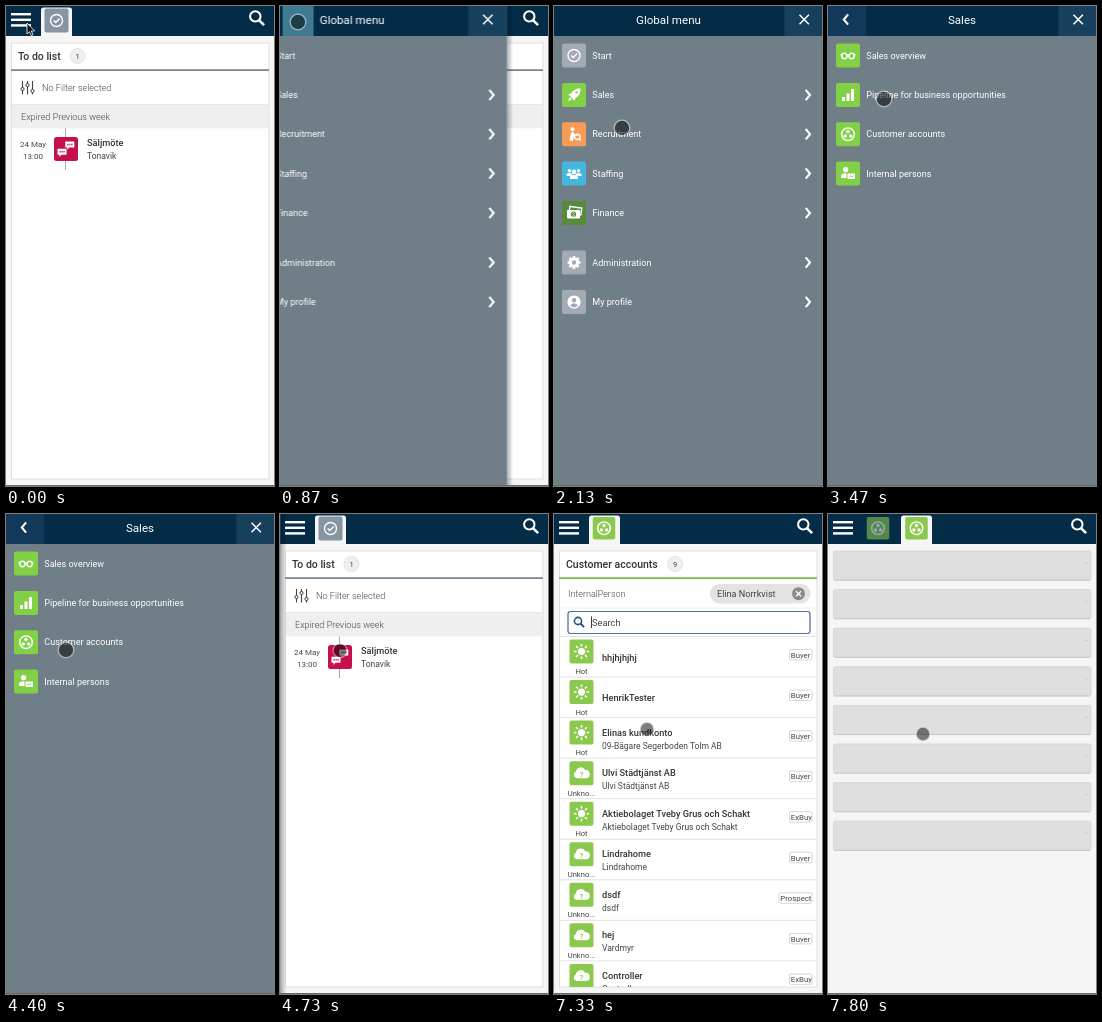
Animation of 268x480 px, one loop 8000 ms. Source, as an HTML page:

```html
<!DOCTYPE html>
<html lang="en">
<head>
<meta charset="utf-8">
<title>CRM mobile menu</title>
<style>
html, body { margin: 0; width: 100%; height: 100%; overflow: hidden; background: #f5f5f5; }
svg { display: block; width: 100vw; height: 100vh; font-family: Roboto, "Open Sans", sans-serif; }
text { fill: #444; white-space: pre; }
.b { font-weight: 500; fill: #333; }
.l { font-weight: 300; }
.w { fill: #fff; }
.mid { text-anchor: middle; }
.ln { fill: none; stroke: #fff; stroke-width: 1.4; }

.cut { animation: 8s step-end infinite; }
#todo { animation-name: todo; }
#bones { animation-name: bones; }
#list { animation-name: list; }
#rows { animation-name: rows; }
#press { animation-name: press; }
#focus { animation-name: focus; }
#tabA { animation-name: list2; }
#tabB { animation-name: last; }
#arrow { animation: arrow 8s linear infinite; }
#touch { animation: touch 8s ease-in-out infinite; }
#dot { animation: dot 8s step-end infinite; }
#panel { animation: panel 8s linear infinite; }
#brand { animation: brand 8s linear infinite; }
#main { animation: main 8s linear infinite; }
#sales { animation: sales 8s linear infinite; }
#bar { animation: bar 8s linear infinite; }

@keyframes todo { 0% { opacity: 1 } 61.625%, 100% { opacity: 0 } }
@keyframes bones { 0% { opacity: 0 } 61.625% { opacity: 1 } 66.625% { opacity: 0 } 97.5%, 100% { opacity: 1 } }
@keyframes list { 0% { opacity: 0 } 66.625% { opacity: 1 } 97.5%, 100% { opacity: 0 } }
@keyframes list2 { 0% { opacity: 0 } 61.625% { opacity: 1 } 97.5%, 100% { opacity: 0 } }
@keyframes rows { 0% { opacity: 0 } 68.375%, 100% { opacity: 1 } }
@keyframes press { 0% { opacity: 0 } 94.125%, 100% { opacity: .07 } }
@keyframes focus { 0% { opacity: 1 } 94.125%, 100% { opacity: 0 } }
@keyframes last { 0% { opacity: 0 } 97.5%, 100% { opacity: 1 } }
@keyframes arrow {
  0%, 2.9% { transform: translate(21px, 17px); opacity: 1 }
  6.6% { transform: translate(18px, 13px); opacity: 1 }
  6.61%, 100% { transform: translate(18px, 13px); opacity: 0 }
}
@keyframes touch {
  0%, 17% { transform: translate(18px, 16px); animation-timing-function: ease-in }
  21% { transform: translate(44px, 88px); animation-timing-function: ease-out }
  24% { transform: translate(63px, 162px) }
  26.6%, 28% { transform: translate(68px, 122px) }
  30.9%, 45.5% { transform: translate(56px, 93px) }
  55.9%, 83% { transform: translate(60px, 136.5px) }
  93.4%, 100% { transform: translate(95px, 220px) }
}
@keyframes dot {
  0% { opacity: 0; transform: scale(1) }
  6.61% { opacity: 1; transform: scale(1) }
  56.625%, 100% { opacity: 1; transform: scale(.9) }
}
@keyframes panel {
  0% { transform: translate(-280px, 0) }
  9.4% { transform: translate(-280px, 0); animation-timing-function: cubic-bezier(.22, 1, .36, 1) }
  14.125%, 59.12% { transform: translate(0, 0) }
  59.125%, 60% { transform: translate(-269px, 0) }
  60.01%, 100% { transform: translate(-280px, 0) }
}
@keyframes brand { 0%, 11.5% { opacity: 1 } 14%, 100% { opacity: 0 } }
@keyframes main { 0%, 33% { opacity: 1 } 35%, 100% { opacity: 0 } }
@keyframes sales { 0%, 33% { opacity: 0 } 35%, 100% { opacity: 1 } }
@keyframes bar { 0%, 77% { opacity: 1 } 82%, 100% { opacity: 0 } }
</style>
</head>
<body>
<svg id="stage" viewBox="0 0 268 480" preserveAspectRatio="none"></svg>
<script>
const GREEN = '#8bc94e', SLATE = '#a2abb5', NAVY = '#042c47';

const text = (x, y, size, cls, s) => `<text x="${x}" y="${y}" font-size="${size}" class="${cls}">${s}</text>`;
const rect = (x, y, w, h, fill, more = '') => `<rect x="${x}" y="${y}" width="${w}" height="${h}" fill="${fill}" ${more}/>`;
const disc = (x, y, r, fill = '#fff') => `<circle cx="${x}" cy="${y}" r="${r}" fill="${fill}"/>`;
const path = (d, more = 'fill="#fff"') => `<path d="${d}" ${more}/>`;
const line = (d, color, w, more = '') => path(d, `fill="none" stroke="${color}" stroke-width="${w}" ${more}`);
const at = (x, y, s) => `<g transform="translate(${x} ${y})">${s}</g>`;
const group = (id, s, cls = '') => `<g id="${id}" class="${cls}">${s}</g>`;
const ring = r => `<circle r="${r}" class="ln"/>`;
const spokes = (n, a, b, w) => Array.from({ length: n }, (_, i) =>
  `<path d="M0 ${-a}V${-b}" stroke="#fff" stroke-width="${w}" transform="rotate(${i * 360 / n})"/>`).join('');
const person = (x, y, k) => `<g transform="translate(${x} ${y}) scale(${k})">${disc(0, -2.6, 2.3)}${path('M-4 4.5V3Q-4 .5 0 .5T4 3V4.5Z')}</g>`;

const icons = {
  check: ring(6) + line('M-2.8 0l2 2 4-4', '#fff', 1.4),
  rocket: path('M6.5-6.5C1.5-6.5-1-4.5-3-1.5L-6-.5-4 1-1 4 .5 6 1.5 3C4.5 1 6.5-1.5 6.5-6.5Z') +
    path('M-4.2 2l2.2 2.2-4.2 2Z') + disc(2.6, -2.6, 1.2, GREEN),
  recruit: disc(-1.5, -5, 2) + path('M-4.5 6.5L-3-1.5-1-2.5 1 0 4 0V1.5H0L-1 6.5Z') +
    `<circle cx="3.3" cy="2.6" r="2.7" class="ln"/>` + line('M5 4.6l2 2', '#fff', 1.5),
  staff: person(-4.6, -.8, .75) + person(4.6, -.8, .75) + person(0, 1, 1),
  cash: rect(-5, -6, 12, 7, 'none', 'class="ln" transform="rotate(8)"') + rect(-7, -3, 13, 8.5, '#fff', 'rx="1"') +
    disc(-.5, 1.2, 2.6, '#558b3a') + text(-.5, 3, 5, 'w mid', '$'),
  gear: spokes(8, 6.4, 3, 2.6) + `<circle r="3.6" fill="none" stroke="#fff" stroke-width="2.8"/>`,
  profile: disc(0, 0, 6.6) + disc(0, -1.8, 2.2, SLATE) + path('M-3.8 3.8Q-3 1.2 0 1.2T3.8 3.8Q2 5.3 0 5.3T-3.8 3.8Z', `fill="${SLATE}"`),
  glasses: at(-3.6, .5, ring(2.7)) + at(3.6, .5, ring(2.7)) + line('M-1.2 0Q0-1 1.2 0M-6.2 0L-7.4-1.4M6.2 0L7.4-1.4', '#fff', 1.2),
  bars: rect(-6, 2, 3, 4, '#fff') + rect(-1.5, -1.5, 3, 7.5, '#fff') + rect(3, -6, 3, 12, '#fff'),
  accounts: ring(6.3) + disc(0, -2.7, 1.7) + disc(-2.6, 1.8, 1.7) + disc(2.6, 1.8, 1.7),
  card: person(-2.4, -.8, 1.15) + rect(-1, -.5, 8.5, 6.5, '#fff', `stroke="${GREEN}"`) + line('M1 4l1.6-2 1.5 1.5L5.6 2', GREEN, .9),
  sun: disc(0, 0, 3.6) + spokes(8, 7.6, 5, 1.5),
  cloud: path('M-5 5A3.5 3.5 0 0 1-5.6-1.6 5 5 0 0 1 3.8-3 4 4 0 0 1 4.8 5Z') + text(0, 4, 8, 'b mid', '?').replace('<text', `<text style="fill:${GREEN}"`)
};
const tile = (x, y, color, icon, s = 24) =>
  at(x, y, rect(-s / 2, -s / 2, s, s, color, 'rx="2"') + icons[icon]);
const lens = (x, y, r, w, color) =>
  `<circle cx="${x}" cy="${y}" r="${r}" fill="none" stroke="${color}" stroke-width="${w}"/>` +
  line(`M${x + r * .7} ${y + r * .7}l${r} ${r}`, color, w * 1.25);
const tab = x => path(`M${x} 30V4q0-2.5 2.5-2.5h26q2.5 0 2.5 2.5V30Z`, 'fill="#f5f5f5"');

const topBar = rect(0, 0, 268, 30, NAVY) +
  [7, 12.6, 18.2].map(y => rect(5, y, 20, 2.4, '#fff')).join('') + lens(249.3, 10.4, 5.2, 2, '#fff');

const card = (title, count, cx, color) =>
  rect(5.5, 37, 257.5, 436, '#fff', 'stroke="#dfdfdf"') + rect(5, 63.2, 258, 1.8, color) +
  text(12, 53.6, 10.5, 'b', title) +
  `<circle cx="${cx}" cy="50" r="7.5" fill="#efefef" stroke="#ddd" stroke-width=".8"/>` + text(cx, 52.8, 7.5, 'mid', count);

const bubble = (x, y) => at(x, y, path('M-4.5-3.5h9v6h-5l-2 2.2v-2.2h-2Z') +
  line('M-2.5-.5h1.2m.8 0h1.2m.8 0h1.2', '#c5104d', 1.4));
const sliders = [[16.5, 83], [21.5, 79], [26.5, 85]].map(([x, y]) =>
  line(`M${x} 75V88.5`, '#444', 1.1) + `<circle cx="${x}" cy="${y}" r="1.6" fill="#fff" stroke="#444"/>`).join('');

const todo = rect(0, 30, 268, 450, '#f5f5f5') + tab(35) + tile(50.5, 14.5, '#8794a2', 'check') +
  card('To do list', 1, 71.5, '#7b8893') + sliders +
  text(36, 85.4, 9.1, 'l', 'No Filter selected') +
  rect(6, 98.5, 256.5, 23.8, '#efefef') + line('M6 98.5H262.5', '#e4e4e4', .8) +
  text(15, 113.7, 9.1, 'l', 'Expired Previous week') +
  line('M59.5 122.5V164', '#aaa', 1) + rect(48, 131, 24, 24, '#c5104d', 'rx="2.5"') +
  bubble(63.8, 139) + bubble(56, 146.2) +
  text(14, 140.6, 8, '', '24 May') + text(17, 152.8, 8, '', '13:00') +
  text(81, 139.8, 9.2, 'b', 'Säljmöte') + text(81, 153.2, 8.5, '', 'Tonavik');

const accounts = [
  ['hhjhjhjhj', '', 1, 'Buyer'],
  ['HenrikTester', '', 1, 'Buyer'],
  ['Elinas kundkonto', '09-Bägare Segerboden Tolm AB', 1, 'Buyer'],
  ['Ulvi Städtjänst AB', 'Ulvi Städtjänst AB', 0, 'Buyer'],
  ['Aktiebolaget Tveby Grus och Schakt', 'Aktiebolaget Tveby Grus och Schakt', 1, 'ExBuy'],
  ['Lindrahome', 'Lindrahome', 0, 'Buyer'],
  ['dsdf', 'dsdf', 0, 'Prospect'],
  ['hej', 'Vardmyr', 0, 'Buyer'],
  ['Controller', 'Controller', 0, 'ExBuy']
];
// The tags are shallow, so their descenders are cut off
const tag = s => {
  const x = s === 'Prospect' ? 225 : 235.5;
  return text(x + 1.3, 21.3, 7.8, '', s) + rect(x, 22, 23, 3, '#fff') +
    rect(x, 13, 258 - x, 10.5, 'none', 'rx="1.5" stroke="#ccc" stroke-width=".8"');
};
const row = ([name, sub, hot, kind], i) => at(0, 122.5 + i * 40.55,
  line('M6 0H262.5', '#e2e2e2', 1) + tile(27.5, 15, GREEN, hot ? 'sun' : 'cloud') +
  text(27.5, 37.6, 7.6, 'mid', hot ? 'Hot' : 'Unkno...') +
  text(48, sub ? 18 : 24, 9.2, 'b', name) + text(48, 31, 8.5, '', sub) + tag(kind));

const list = rect(0, 30, 268, 450, '#f5f5f5') + card('Customer accounts', 9, 121, '#7fc04a') +
  text(14, 82.8, 9, 'l', 'InternalPerson') + rect(156, 70, 100.5, 19.5, '#e3e3e3', 'rx="9.75"') +
  text(163, 82.8, 9.1, '', 'Elina Norrkvist') + disc(244.5, 79.7, 6.5, '#8b8b8b') +
  line('M242 77.2l5 5m0-5l-5 5', '#fff', 1.3) + line('M6 94H262.5', '#ececec', .8) +
  rect(14, 97.5, 242, 22, '#fff', 'rx="2.5" stroke="#c4c9d0"') + lens(24, 107, 3.6, 1.6, '#24567f') +
  text(38, 111.8, 9.3, '', 'Search') +
  group('focus', rect(14, 97.5, 242, 22, 'none', 'rx="2.5" stroke="#4c6f9c" stroke-width="1.1"') +
    rect(37, 102.5, .9, 11.5, '#222'), 'cut') +
  group('rows', `<g clip-path="url(#inner)">${accounts.map(row).join('')}</g>` +
    group('bar', rect(259, 125, 2.2, 280, '#c9c9c9', 'rx="1.1"')), 'cut') +
  group('press', rect(6, 204, 256.5, 40, '#000'), 'cut');

const bones = rect(0, 30, 268, 450, '#f5f5f5') + Array.from({ length: 8 }, (_, i) =>
  at(5.5, 37 + i * 38.6, rect(0, 0, 257.5, 29, '#dfdfdf', 'rx="1.5" stroke="#d2d2d2" stroke-width=".8"') +
    line('M1 29.2H256.5', '#c4c4c4', .9) + disc(253, 12, .6, '#aaa'))).join('');

const chevron = (x, y, dir = 1) => line(`M${x - 2.3 * dir} ${y - 5.2}L${x + 2 * dir} ${y}L${x - 2.3 * dir} ${y + 5.2}`, '#fff', 2.1);
const menuRow = ([label, y, color, icon, more]) =>
  tile(20, y, color, icon) + text(38.3, y + 3.2, 9.05, 'w', label) + (more ? chevron(254, y) : '');

const mainMenu = text(114.5, 17.8, 11.6, 'w mid', 'Global menu') + [
  ['Start', 49.5, SLATE, 'check'],
  ['Sales', 89, '#82d046', 'rocket', 1],
  ['Recruitment', 128.2, '#f79b55', 'recruit', 1],
  ['Staffing', 167.5, '#45b6dd', 'staff', 1],
  ['Finance', 207, '#558b3a', 'cash', 1],
  ['Administration', 256.5, SLATE, 'gear', 1],
  ['My profile', 296, SLATE, 'profile', 1]
].map(menuRow).join('');

const salesMenu = rect(0, 0, 38, 30, '#12395a') + chevron(17.8, 13.5, -1) + text(134, 17.8, 11.6, 'w mid', 'Sales') + [
  ['Sales overview', 49.5, '#82d046', 'glasses'],
  ['Pipeline for business opportunities', 89, '#82d046', 'bars'],
  ['Customer accounts', 128.2, '#82d046', 'accounts'],
  ['Internal persons', 167.5, '#82d046', 'card']
].map(menuRow).join('');

const panel = rect(269.5, 0, 6, 480, 'url(#shade)') + rect(-4, 0, 273.5, 480, '#707e87') + rect(-4, 0, 273.5, 30, NAVY) +
  group('brand', rect(45, 0, 31, 30, '#3f7a90')) +
  rect(230.5, 0, 39, 30, '#17405c') + line('M245.5 8.8l9.4 9.4m0-9.4l-9.4 9.4', '#fff', 1.5) +
  group('main', mainMenu) + group('sales', salesMenu);

document.getElementById('stage').innerHTML =
  `<defs><clipPath id="inner"><rect x="5" y="120" width="258" height="353"/></clipPath>
  <linearGradient id="shade"><stop stop-color="#000" stop-opacity=".3"/><stop offset="1" stop-color="#000" stop-opacity="0"/></linearGradient></defs>` +
  rect(0, 0, 268, 480, '#f5f5f5') + topBar +
  group('todo', todo, 'cut') + group('bones', bones, 'cut') + group('list', list, 'cut') +
  group('tabA', tab(35) + tile(50, 14.2, GREEN, 'accounts', 22.5), 'cut') +
  group('tabB', `<g opacity=".6">${tile(50, 14.2, GREEN, 'accounts', 22.5)}</g>` + tab(73) + tile(88.5, 14.2, GREEN, 'accounts', 22.5), 'cut') +
  group('panel', panel) + rect(0, 479, 268, 1, '#666') +
  group('arrow', path('M0 0V11L2.5 8.7 4.2 12.6 6 11.8 4.3 8H7.6Z', 'fill="#111" stroke="#fff" stroke-width=".8"')) +
  group('touch', group('dot', '<circle r="7.6" fill="#000" fill-opacity=".5"/><circle r="7.8" fill="none" stroke="#fff" stroke-opacity=".5" stroke-width="1.3"/>'));
</script>
</body>
</html>
```
